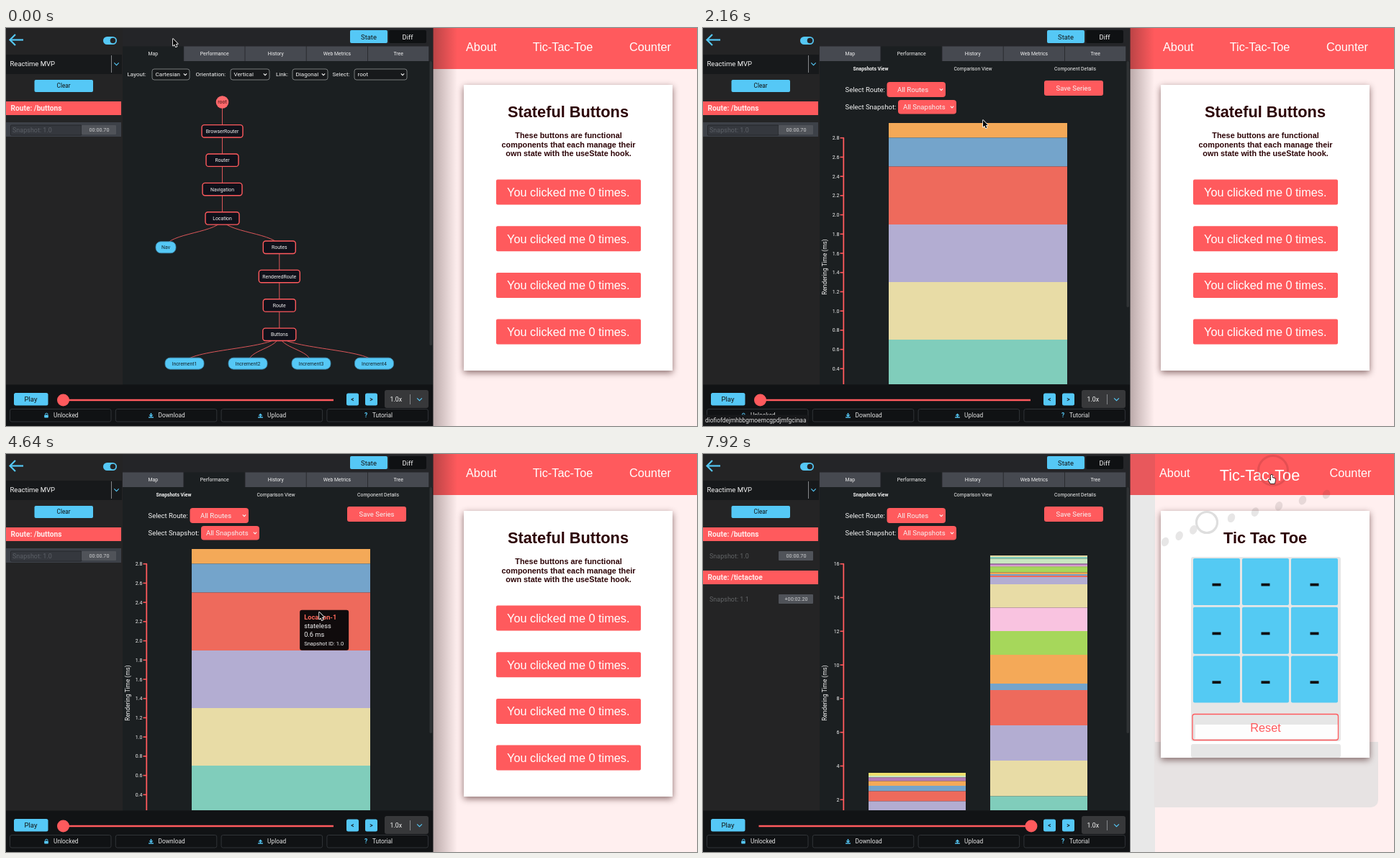
An HTML page with a canvas that plays this animation: 960 px wide and 553 px high, repeating every 8 s.

```html
<!DOCTYPE html>
<html lang="en">
<head>
<meta charset="utf-8">
<title>State debugger</title>
<style>
html, body { margin: 0; width: 100%; height: 100%; overflow: hidden; background: #111316; }
canvas { display: block; width: 100%; height: 100%; }
</style>
</head>
<body>
<canvas id="stage" width="960" height="553"></canvas>
<script>
const ctx = document.getElementById('stage').getContext('2d');
const LOOP = 8000, STEP = 80;
const UI = 'Roboto, sans-serif', PAGE = '"Liberation Sans", Arial, sans-serif';
const RED = '#ff5a5d', BLUE = '#55c8f6', WHITE = '#f4f4f4', DARK = '#1b1f21';
const TEAL = '#80cdbb', SAND = '#e8dca6', LILAC = '#b3add2', CORAL = '#ee6a5c', SKY = '#74a4cb',
  ORANGE = '#f4a958', GREEN = '#a6d75b', PINK = '#f9c3e0', PLUM = '#b57bb8', MINT = '#c9e8c0';

// moments when the picture switches
const AT = { chart: 1360, path: 1680, statusEnd: 2400, focus: 5520, click: 6800, page: 7120, panel: 7360 };

// cursor path: time, x, y
const PATH = [
  [0, 232, 15], [480, 232, 15], [1040, 274, 38], [1440, 275, 38], [2080, 389, 128], [2640, 389, 128],
  [3360, 382, 246], [4400, 382, 246], [4960, 506, 185], [5360, 641, 119], [5600, 700, 94],
  [6000, 700, 94], [6400, 865, 53], [6640, 791, 23], [7120, 791, 23], [7920, 790, 30], [8000, 790, 30]
];

function cursorAt(t) {
  const i = Math.max(1, PATH.findIndex(p => p[0] >= t));
  const [t0, x0, y0] = PATH[i - 1], [t1, x1, y1] = PATH[i];
  const k = (t - t0) / (t1 - t0);
  return { x: x0 + (x1 - x0) * k, y: y0 + (y1 - y0) * k };
}

function rect(x0, y0, x1, y1, fill, radius = 0, stroke, width = 1) {
  ctx.beginPath();
  ctx.roundRect(x0, y0, x1 - x0, y1 - y0, radius);
  if (fill) { ctx.fillStyle = fill; ctx.fill(); }
  if (stroke) { ctx.strokeStyle = stroke; ctx.lineWidth = width; ctx.stroke(); }
}

function line(color, width, ...pts) {
  ctx.beginPath();
  for (let i = 0; i < pts.length; i += 2) ctx.lineTo(pts[i], pts[i + 1]);
  ctx.strokeStyle = color;
  ctx.lineWidth = width;
  ctx.stroke();
}

function circle(x, y, r, fill, stroke, width = 1) {
  ctx.beginPath();
  ctx.arc(x, y, r, 0, Math.PI * 2);
  if (fill) { ctx.fillStyle = fill; ctx.fill(); }
  if (stroke) { ctx.strokeStyle = stroke; ctx.lineWidth = width; ctx.stroke(); }
}

// y is the middle of the capitals
function text(str, x, y, size, color = WHITE, align = 'left', weight = 400, font = UI) {
  ctx.font = `${weight} ${size}px ${font}`;
  ctx.textAlign = align;
  ctx.fillStyle = color;
  ctx.fillText(str, x, y + size * 0.357);
}

function chevron(x, y, color, size = 2.5) {
  line(color, 1.1, x - size, y - size / 2, x, y + size / 2, x + size, y - size / 2);
}

function drawSidebar(visited) {
  rect(0, 0, 162, 496, '#242425');
  line(BLUE, 2.2, 24, 16.5, 6, 16.5);
  line(BLUE, 2.2, 13, 9, 5.5, 16.5, 13, 24);
  rect(135, 12, 154, 23, BLUE, 5.5);
  circle(148.5, 17.5, 4.3, '#242425', BLUE, 1);
  rect(0, 37, 161, 64, '#17191b');
  text('Reactime MVP', 5.5, 50, 9.5);
  line('#85878a', 1, 146.5, 38, 146.5, 62);
  chevron(153.5, 50, BLUE, 3.2);
  rect(39.5, 72, 121, 89, BLUE, 2);
  text('Clear', 80, 80.5, 8.2, '#111', 'center');
  drawRoute('/buttons', 'Snapshot: 1.0', '00:00.70', 102, !visited);
  if (visited) drawRoute('/tictactoe', 'Snapshot: 1.1', '+00:02.20', 162, false);
}

function drawRoute(route, name, time, y, active) {
  rect(0, y, 160, y + 19, RED);
  text('Route: ' + route, 6.5, y + 9.5, 10.2, '#ffeaea', 'left', 700);
  if (active) {
    rect(0, y + 29, 160, y + 49, '#3d4148');
    rect(6.5, y + 33, 105, y + 47, '#35383e', 1, '#25272b');
  }
  text(name, 9, y + 39.5, 9, active ? '#5b5f66' : '#626466');
  rect(105, y + 33, 153, y + 46, '#505359', 1);
  text(time, 129.5, y + 39.5, 7.2, '#cfd0d2', 'center');
}

function drawTabs(chart, hover) {
  rect(162, 0, 593, 46, '#242528');
  rect(478, 3, 530, 21, BLUE, 2);
  text('State', 504, 12.5, 9.4, '#111', 'center');
  rect(532, 3, 584, 21, '#0f1113', 2);
  text('Diff', 558, 12.5, 9.4, WHITE, 'center');
  ['Map', 'Performance', 'History', 'Web Metrics', 'Tree'].forEach((name, i) => {
    const x = 162 + i * 85.2, active = i === (chart ? 1 : 0);
    rect(x, 25.5, x + 84.4, 46, active ? DARK : i === 1 && hover ? '#62656a' : '#464950');
    text(name, x + 42.4, 36, 6.9, WHITE, 'center');
  });
}

function select(label, lx, value, x0, x1) {
  text(label, lx, 64.5, 8.1);
  rect(x0, 57, x1, 72, '#17191b', 3, '#85888a', 0.9);
  text(value, x0 + 4.5, 64.5, 8.1);
  chevron(x1 - 6, 64.5, WHITE, 2.2);
}

function link(x0, y0, x1, y1) {
  const m = (y0 + y1) / 2;
  ctx.beginPath();
  ctx.moveTo(x0, y0);
  ctx.bezierCurveTo(x0, m, x1, m, x1, y1);
  ctx.strokeStyle = '#dc5659';
  ctx.lineWidth = 1;
  ctx.stroke();
}

function node(name, x, y, w, leaf) {
  const h = leaf ? 8 : 8.7;
  rect(x - w / 2, y - h, x + w / 2, y + h, leaf ? BLUE : '#10111a', leaf ? 7 : 3.5, leaf ? '#3d85a8' : RED, leaf ? 0.8 : 1.4);
  text(name, x, y, 6.9, leaf ? '#14242c' : WHITE, 'center');
}

function drawTree() {
  select('Layout:', 168.5, 'Cartesian', 203, 255);
  select('Orientation:', 263.5, 'Vertical', 312, 366);
  select('Link:', 375, 'Diagonal', 398, 447);
  select('Select:', 453.5, 'root', 484, 557);
  const trunk = [['BrowserRouter', 57], ['Router', 45], ['Navigation', 55], ['Location', 47]];
  const branch = [['Routes', 45], ['RenderedRoute', 57], ['Route', 45], ['Buttons', 46]];
  const gap = 40.35, rowY = i => 103 + i * gap, leaves = [248, 336, 424, 511.5];
  line('#dc5659', 1, 300.5, 103, 300.5, rowY(4));
  line('#dc5659', 1, 379.8, rowY(5), 379.8, rowY(8));
  link(300.5, rowY(4), 222, rowY(5));
  link(300.5, rowY(4), 379.8, rowY(5));
  leaves.forEach(x => link(379.8, rowY(8), x, rowY(9)));
  circle(300.5, 103, 8.8, '#ff686b');
  text('root', 300.5, 103, 6.9, '#3a1012', 'center');
  trunk.forEach(([name, w], i) => node(name, 300.5, rowY(i + 1), w));
  branch.forEach(([name, w], i) => node(name, 379.8, rowY(i + 5), w));
  node('Nav', 222, rowY(5), 28, true);
  leaves.forEach((x, i) => node('Increment' + (i + 1), x, rowY(9), 54, true));
}

// bands run downward: top, colour, top, colour ...
function bar(x0, x1, ...bands) {
  for (let i = 0; i < bands.length; i += 2) rect(x0, bands[i], x1, bands[i + 2] ?? 495, bands[i + 1]);
}

function axis(top, step, gap, digits) {
  line(RED, 1.8, 195.3, 152.5, 195.3, 495);
  for (let i = 0; 152.7 + i * gap < 490; i++) {
    const y = 152.7 + i * gap;
    line(RED, 1.6, 190.5, y, 196, y);
    text((top - i * step).toFixed(digits), 189.5, y, 7, WHITE, 'right');
  }
}

function redSelect(label, value, x0, x1, y0, y1, tx) {
  const y = (y0 + y1) / 2;
  text(label, 197.5, y, 9.5);
  rect(x0, y0, x1, y1, RED, 4);
  text(value, tx, y, 9.6);
  chevron(x1 - 6, y, WHITE, 2.2);
}

function drawChart(visited) {
  text('Snapshots View', 233, 56.5, 6.8, WHITE, 'center', 700);
  text('Comparison View', 375, 56.5, 6.8, WHITE, 'center');
  text('Component Details', 517, 56.5, 6.8, WHITE, 'center');
  redSelect('Select Route:', 'All Routes', 255.5, 337, 75, 96, 270);
  redSelect('Select Snapshot:', 'All Snapshots', 271, 352, 100, 119.5, 278);
  rect(474, 73, 556, 94, RED, 3);
  text('Save Series', 515, 83.5, 9.5, WHITE, 'center');
  if (visited) {
    axis(16, 2, 46.8, 0);
    bar(230, 365, 443, '#efe06d', 447, MINT, 449.5, PLUM, 454.5, ORANGE, 461, SKY, 468.5, CORAL, 482.5, LILAC);
    bar(399, 534, 141, SAND, 143, TEAL, 145.5, MINT, 152.5, PLUM, 155, PINK, 156.5, GREEN, 164.5, ORANGE, 167, SKY,
      169, CORAL, 171, LILAC, 181, SAND, 213.5, PINK, 246, GREEN, 279, ORANGE, 319, SKY, 328, CORAL,
      377, LILAC, 426, SAND, 475.5, TEAL);
  } else {
    axis(2.8, 0.2, 26.72, 1);
    bar(258, 506, 132, ORANGE, 152.5, SKY, 192.5, CORAL, 273, LILAC, 353, SAND, 433, TEAL);
  }
  ctx.save();
  ctx.translate(169.5, 332);
  ctx.rotate(-Math.PI / 2);
  text('Rendering Time (ms)', 0, 0, 8.3, WHITE, 'center');
  ctx.restore();
}

function drawTooltip(c) {
  const x = c.x - 27, y = c.y - 3;
  rect(x, y, x + 68, y + 56, 'rgba(8,8,9,.96)', 3);
  text('Location-1', x + 6, y + 10, 9.3, '#ff6a5c', 'left', 700);
  text('stateless', x + 6, y + 22, 9.3);
  text('0.6 ms', x + 6, y + 34, 9.3);
  text('Snapshot ID: 1.0', x + 6, y + 46.5, 7.6);
}

function icon(kind, x, y) {
  if (kind === 'help') return text('?', x, y, 8.5, BLUE, 'center', 700);
  if (kind === 'lock') {
    rect(x - 2.8, y - 0.5, x + 2.8, y + 3.5, BLUE, 0.8);
    ctx.beginPath();
    ctx.arc(x + 0.3, y - 1, 1.8, Math.PI, Math.PI * 2);
    ctx.strokeStyle = BLUE;
    ctx.lineWidth = 1;
    return ctx.stroke();
  }
  const d = kind === 'down' ? 1 : -1;
  line(BLUE, 1.6, x, y - 3 * d, x, y + d);
  line(BLUE, 1.3, x - 2.2, y - 0.6 * d, x, y + 1.6 * d, x + 2.2, y - 0.6 * d);
  line(BLUE, 1.4, x - 3.4, y + 3, x + 3.4, y + 3);
}

function drawFooter(visited) {
  rect(0, 495.5, 593, 553, '#111315');
  rect(11, 507, 58.5, 524.5, BLUE, 2.5);
  text('Play', 34.5, 516, 9.5, '#111', 'center');
  line(RED, 2.6, 77.5, 517, 455, 517);
  circle(visited ? 456 : 79.5, 517, 8.5, RED);
  [['<', 473], ['>', 499]].forEach(([sign, x]) => {
    rect(x, 507.5, x + 17, 524.5, BLUE, 2.5);
    text(sign, x + 8.5, 516, 8.5, '#111', 'center', 500);
  });
  rect(526, 503, 587, 528, '#37383a', 3);
  text('1.0x', 533.5, 516, 8.8);
  line('#85878a', 1, 561.5, 509, 561.5, 523);
  chevron(574.5, 516, BLUE, 3.4);
  [['Unlocked', 'lock', 56, 66], ['Download', 'down', 201.5, 211.5], ['Upload', 'up', 353.5, 363], ['Tutorial', 'help', 500, 509]]
    .forEach(([name, kind, ix, tx], i) => {
      const x = 5.5 + i * 146.8;
      rect(x, 529.5, x + 140.5, 547, '#101214', 2.5, '#313438');
      icon(kind, ix, 538);
      text(name, tx, 538, 8.4, '#e4e4e4');
    });
}

function drawStatus(str) {
  ctx.font = `400 8.4px ${UI}`;
  rect(0, 537.5, ctx.measureText(str).width + 6, 553, '#17181a', [0, 2, 0, 0]);
  text(str, 3, 545, 8.4, '#dedede');
}

function card(bottom) {
  ctx.save();
  ctx.shadowColor = 'rgba(60,20,20,.6)';
  ctx.shadowBlur = 9;
  ctx.shadowOffsetY = 3;
  rect(636, 79, 926, bottom, '#fff');
  ctx.restore();
}

function drawButtons() {
  card(476);
  const ink = '#2c0306';
  text('Stateful Buttons', 781, 116.5, 21.75, ink, 'center', 700, PAGE);
  ['These buttons are functional', 'components that each manage their', 'own state with the useState hook.']
    .forEach((row, i) => text(row, 781.5, 149.5 + i * 12.5, 10.87, ink, 'center', 700, PAGE));
  for (let i = 0; i < 4; i++) {
    const y = 210.5 + i * 64.7;
    rect(681, y, 882, y + 35, RED, 2);
    text('You clicked me 0 times.', 781.3, y + 17.5, 16.3, '#fff', 'center', 400, PAGE);
  }
}

function drawGame() {
  const grey = '#e6e6e6';
  rect(627, 400, 938, 491, '#e7e3e3', [0, 0, 10, 0]);
  card(422);
  text('Tic Tac Toe', 781, 116.5, 21.75, '#2c0306', 'center', 700, PAGE);
  rect(678, 143, 886, 399, grey, 3);
  rect(678, 403, 886, 422, grey, 3);
  for (let i = 0; i < 9; i++) {
    const x = 681 + (i % 3) * 68, y = 145 + Math.floor(i / 3) * 67.8;
    rect(x, y, x + 65, y + 65, '#54caf3', 2);
    rect(x + 26.5, y + 34.7, x + 38.5, y + 38.5, '#101010');
  }
  rect(684, 376, 882, 396, '#fdfdfd');
  rect(680, 361.5, 882.5, 397.5, null, 3, RED, 1.3);
  text('Reset', 781.5, 380, 16.3, RED, 'center', 400, PAGE);
}

function drawPage(t, hover) {
  rect(593, 0, 960, 553, '#ffefef');
  rect(593, 0, 960, 57, RED);
  if (t >= AT.focus) {
    rect(593, 0, 628, 57, '#e8585c');
    rect(593, 57, 628, 553, '#e8e8e8');
  } else {
    const shade = ctx.createLinearGradient(593, 0, 627, 0);
    shade.addColorStop(0, 'rgba(40,20,20,.32)');
    shade.addColorStop(1, 'rgba(40,20,20,0)');
    rect(593, 0, 627, 553, shade);
  }
  t >= AT.page ? drawGame() : drawButtons();
  text('About', hover ? 634 : 639, 26, 16.3, '#fff', 'left', 400, PAGE);
  text('Tic-Tac-Toe', 773.5, hover ? 29 : 26, hover ? 21.75 : 16.3, '#fff', 'center', 400, PAGE);
  text('Counter', hover ? 870.5 : 866, 26, 16.3, '#fff', 'left', 400, PAGE);
}

// faint marks the pointer leaves on the page
function drawTrail(t) {
  for (let s = 5360; s < Math.min(t, 6480); s += STEP) {
    const p = cursorAt(s);
    if (s >= 5600 && s <= 6000) continue;
    ctx.beginPath();
    ctx.ellipse(p.x + 1, p.y + 3, 5, 6.5, 0.4, 0, Math.PI * 2);
    ctx.fillStyle = 'rgba(70,60,60,.13)';
    ctx.fill();
  }
  if (t >= AT.focus + STEP) circle(700, 95, 14.5, null, '#dedede', 3.2);
  if (t >= AT.click) {
    const fresh = t < AT.click + 240;
    circle(792, 23, 20.5, null, fresh ? '#2b1516' : 'rgba(90,20,25,.16)', fresh ? 1.6 : 3);
  }
}

function drawCursor({ x, y }, hand) {
  const arrow = 'M0 0V9.6L2.2 7.6L3.8 11.2L5.4 10.5L3.8 7H6.8Z';
  const fist = 'M-1 -2.5Q0 -4 1 -2.5V1L4.5 2Q5.5 2.5 5.2 4.5L4 9H-1.5L-4.5 4.5Q-4.3 3 -2.8 3.6L-1 5Z';
  const shape = new Path2D(hand ? fist : arrow);
  ctx.save();
  ctx.translate(x, y + (hand ? 2 : 0));
  ctx.lineJoin = 'round';
  ctx.strokeStyle = hand ? '#111' : '#fff';
  ctx.lineWidth = hand ? 1.4 : 1.6;
  ctx.stroke(shape);
  ctx.fillStyle = hand ? '#fff' : '#050505';
  ctx.fill(shape);
  ctx.restore();
}

function draw(t) {
  const c = cursorAt(t), chart = t >= AT.chart, visited = t >= AT.panel;
  const onTab = c.x > 248 && c.x < 333 && c.y > 25 && c.y < 46;
  const onNav = c.x > 718 && c.x < 830 && c.y < 42;
  drawPage(t, onNav);
  rect(0, 0, 593.5, 553, DARK);
  drawTabs(chart, onTab);
  chart ? drawChart(visited) : drawTree();
  rect(588.5, 46, 592, chart ? 388 : 441, '#303335', 2);
  drawSidebar(visited);
  drawFooter(visited);
  if (t >= 960 && t < AT.statusEnd) {
    drawStatus('diofiofdejmhbbgmoemcgpdjmfgcinaa' + (t < AT.path ? '/performa...' : ''));
  }
  if (chart && c.x > 258 && c.x < 506 && c.y > 192.5 && c.y < 273) drawTooltip(c);
  drawTrail(t);
  drawCursor(c, onTab || onNav);
}

const start = performance.now();
function frame() {
  const t = (performance.now() - start) % LOOP;
  draw(Math.floor(t / STEP) * STEP);
  requestAnimationFrame(frame);
}
frame();
</script>
</body>
</html>
```
